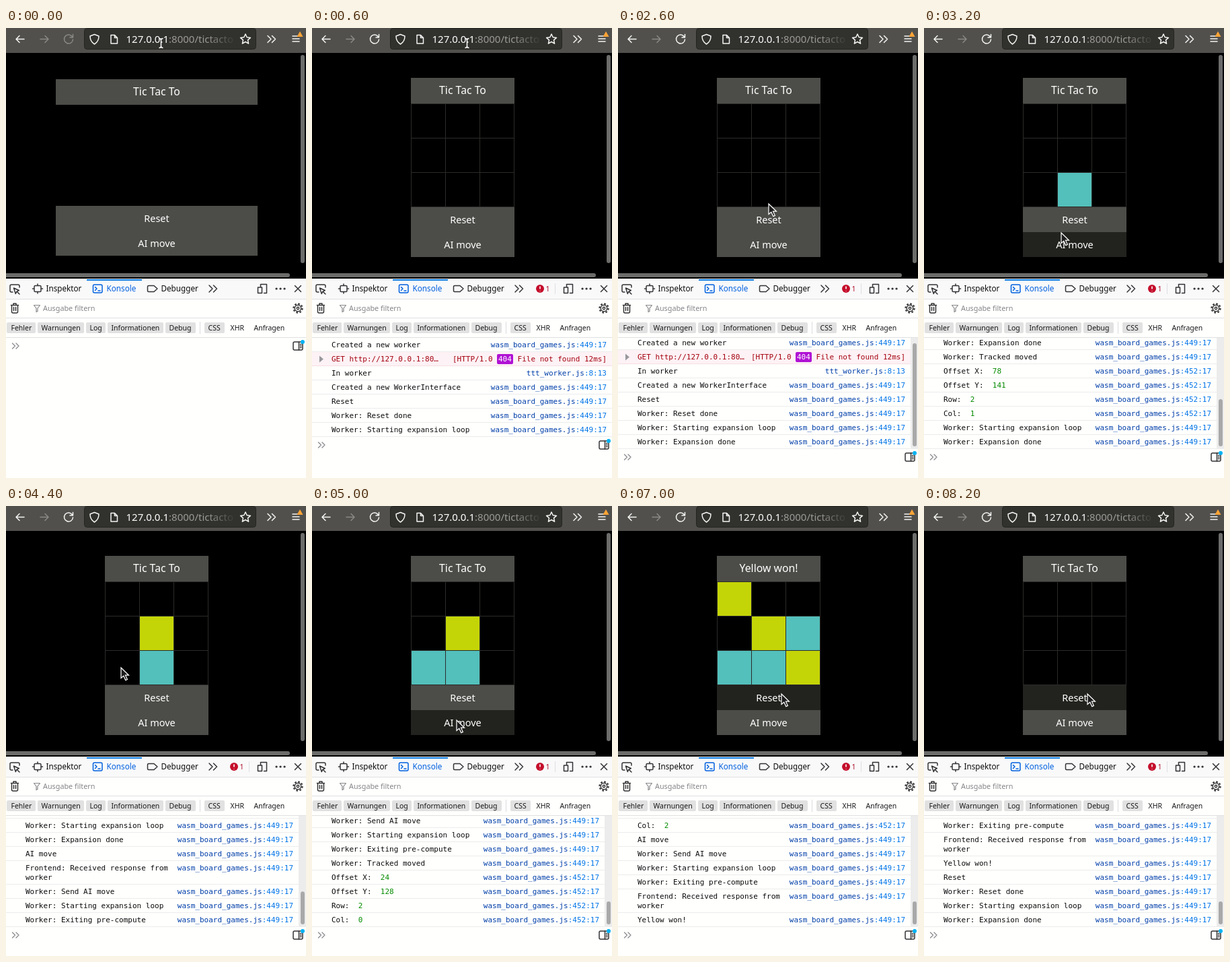
Animation, 446 px wide and 668 px high, one loop 9.4 s. Source, as an HTML page:

```html
<!DOCTYPE html>
<html lang="de">
<head>
<meta charset="utf-8">
<title>Tic Tac To</title>
<style>
html, body { margin: 0; width: 100%; height: 100%; overflow: hidden; background: #fffffd; }
svg { display: block; }
text { font-family: "Noto Sans", "Open Sans", sans-serif; white-space: pre; }
.icon { fill: none; stroke: #333336; stroke-width: 1.5; stroke-linecap: round; stroke-linejoin: round; }
.light { stroke: #f4f4f2; }
.tab text { font-size: 11.7px; fill: #0c0c0d; }
.chips text { font-size: 10.5px; fill: #18181a; }
.page text { fill: #fff; font-size: 14.5px; text-anchor: middle; }
#rows text, #rows tspan { font-family: "DejaVu Sans Mono", monospace; }
#rows text { font-size: 11px; fill: #0c0c0d; }
#rows .end { text-anchor: end; }
#rows .file { fill: #003eaa; }
#rows .pos { fill: #0074e8; }
#rows .num { fill: #058b00; }
#rows .err { fill: #a4000f; }
</style>
</head>
<body>
<svg width="446" height="668" viewBox="0 0 446 668">
  <defs>
    <linearGradient id="fade"><stop stop-color="#31312e" stop-opacity="0"/><stop offset="1" stop-color="#31312e"/></linearGradient>
    <clipPath id="view"><rect y="460" width="446" height="165"/></clipPath>
  </defs>
  <rect width="446" height="668" fill="#fffffd"/>

  <!-- browser bar -->
  <rect width="446" height="37" fill="#51504d"/>
  <rect x="116.500" y="0.500" width="255" height="31" rx="4" fill="#31312e" stroke="#242421"/>
  <g class="icon light">
    <path d="M27 16.500H15M20 11.500l-5 5 5 5"/>
    <path d="M51 16.500H63M58 11.500l5 5-5 5" opacity=".35"/>
    <path id="reload" d="M98.500 13a6.500 6.500 0 1 0 1 4M99.500 9.500V14H95"/>
    <path d="M131.500 9.500l6.500 2.500q0 8-6.500 12-6.500-4-6.500-12z"/>
    <path d="M156 10.500h5.500l4 4v8.500h-9.500zM161.500 10.500v4h4"/>
    <path d="M356 9l2.200 4.800 5.300.6-4 3.500 1.100 5.300-4.600-2.700-4.600 2.700 1.100-5.300-4-3.500 5.300-.6z"/>
    <path d="M389 11.500l5 5-5 5M395.500 11.500l5 5-5 5"/>
    <path d="M426 12h10M426 16h10M426 20h10"/>
  </g>
  <path d="M437 5l4.500 8h-9z" fill="#ffa436"/>
  <text x="178.500" y="22" font-size="15" fill="#fff">127.0.0.1<tspan fill="#9b9a97">:8000/tictacto</tspan></text>
  <rect x="300" y="4" width="42" height="25" fill="url(#fade)"/>

  <!-- web page -->
  <rect y="37" width="446" height="335" fill="#000"/>
  <rect x="438" y="40" width="6" height="309" rx="3" fill="#6c6c6a"/>
  <rect x="-3" y="364" width="425" height="6" rx="3" fill="#6c6c6a"/>
  <g class="page" id="page"></g>

  <!-- developer tools -->
  <rect y="372" width="446" height="30" fill="#f9f9fa"/>
  <path d="M0 402.500H446M0 430.500H446M0 459.500H446" stroke="#e0e0e2"/>
  <rect x="120" y="373" width="82" height="2" fill="#0a7be6"/>
  <g class="icon">
    <path d="M10 392H8q-2 0-2-2v-7q0-2 2-2h10q2 0 2 2v2M11.500 386l2.800 8.500 1.700-3.300 3.300-1.700zM16.500 391.500l3.500 3.500"/>
    <rect x="42" y="382.500" width="10" height="9" rx="1.500"/>
    <path d="M47 380v2M47 392v2M39.500 387h2M52.500 387h2"/>
    <path d="M212 382.500h8l5 4.500-5 4.500h-8q-1.500 0-1.500-1.500v-6q0-1.500 1.500-1.500z"/>
    <path d="M302 382l5 5-5 5M308.500 382l5 5-5 5"/>
    <path d="M378.500 384v-3.500h9v13h-4M374.500 385h6v8.500h-6z"/>
    <path d="M402 387h.1M408 387h.1M414 387h.1" stroke-width="3.200"/>
    <path d="M429.500 382.500l9 9M438.500 382.500l-9 9"/>
    <path d="M7.500 411.500h11M11 411v-2h4v2M8.500 412v9q0 2 2 2h5q2 0 2-2v-9M11.500 414.500v5M14.500 414.500v5"/>
    <path d="M41.500 411.500h9l-3.500 4.500v4.500l-2 1v-5.500z" stroke="#8a8a8e" stroke-width="1.200"/>
    <circle cx="434" cy="416" r="4.700"/>
    <circle cx="434" cy="416" r="1.700"/>
    <circle cx="434" cy="416" r="6.600" stroke-width="2.200" stroke-linecap="butt" stroke-dasharray="2.600 2.584"/>
    <g stroke="#0060df"><rect x="129.500" y="381" width="13.500" height="12" rx="2"/><path d="M132.500 384.500l2.500 2.500-2.500 2.500M137 390h3"/></g>
  </g>
  <g class="tab">
    <text x="59.500" y="391">Inspektor</text>
    <text x="149.500" y="391" style="fill:#0060df">Konsole</text>
    <text x="230.500" y="391">Debugger</text>
  </g>
  <g id="badge">
    <circle cx="339" cy="387" r="6" fill="#c50e2c"/>
    <path d="M339 383.500v4M339 390v.5" stroke="#fff" stroke-width="1.600"/>
    <text x="347.500" y="391" font-size="10.500" fill="#b0102a">1</text>
    <path d="M361.500 379v16" stroke="#e0e0e2"/>
  </g>
  <text x="55" y="420" font-size="10.800" fill="#85858a">Ausgabe filtern</text>
  <g class="chips" id="chips"></g>
  <path d="M288.500 436v18" stroke="#dcdcde"/>

  <!-- console -->
  <g id="rows" clip-path="url(#view)"></g>
  <g id="scroll"><rect x="435" y="460" width="11" height="165" fill="#ececec"/><rect id="thumb" x="438" width="6" rx="3" fill="#a9a9a9"/></g>
  <g id="prompt">
    <g class="icon">
      <path d="M9.500 8l4 4-4 4M15 8l4 4-4 4" stroke="#8c8c90" stroke-width="1.300"/>
      <rect x="427" y="6" width="14" height="12" rx="2"/>
      <path d="M435.500 6v12M437.500 9.500h1.500M437.500 12h1.500M437.500 14.500h1.500"/>
    </g>
    <circle cx="441" cy="6" r="3" fill="#00b3f4"/>
  </g>

  <!-- pointers -->
  <path id="beam" d="M227.500 15.500q3 0 3 2.500v9q0 2.500-3 2.500M233.500 15.500q-3 0-3 2.500v9q0 2.500 3 2.500" fill="none" stroke="#fff" stroke-width="1.500"/>
  <path id="arrow" d="M0 0V15.500L3.800 12.200 6.800 18.600 9.400 17.400 6.500 11.200H11.500Z" fill="#1c1c1c" stroke="#fff" stroke-width="1.200"/>
</svg>
<script>
const LOOP = 9400, STEP = 200;
const TEAL = "#53c0bb", YELLOW = "#c4d507", PANEL = "#4c4c48", HOVER = "#22221e";
const $ = id => document.getElementById(id);
const rect = (x, y, w, h, fill, rx = 0) => `<rect x="${x}" y="${y}" width="${w}" height="${h}" rx="${rx}" fill="${fill}"/>`;
const text = (x, y, str, attrs = "") => `<text x="${x}" y="${y}" ${attrs}>${str}</text>`;

const START = "Worker: Starting expansion loop", DONE = "Worker: Expansion done";
const EXIT = "Worker: Exiting pre-compute", SEND = "Worker: Send AI move", ANSWER = "Frontend: Received response from\nworker";
const ERROR = "GET http://127.0.0.1:80…";
const click = (x, y, row, col) => ["Worker: Tracked moved", "Offset X:  " + x, "Offset Y:  " + y, "Row:  " + row, "Col:  " + col];

// [time, console lines]
const log = [
  [200, ["Created a new worker", ERROR]],
  [400, ["In worker", "Created a new WorkerInterface", "Reset"]],
  [600, ["Worker: Reset done", START]],
  [1000, [DONE]],
  [2800, click(78, 141, 2, 1)],
  [3000, [START]],
  [3200, [DONE]],
  [3600, ["AI move"]],
  [3800, [ANSWER, SEND]],
  [4000, [START]],
  [4200, [EXIT]],
  [4600, click(24, 128, 2, 0)],
  [5200, ["AI move", SEND, START]],
  [5400, [EXIT, ANSWER]],
  [6000, click(121, 83, 1, 2)],
  [6800, ["AI move", SEND, START, EXIT, ANSWER, "Yellow won!"]],
  [7800, ["Reset", "Worker: Reset done", START]],
  [8200, [DONE]],
];
// [time, row, column, colour]
const moves = [
  [2800, 2, 1, TEAL], [3800, 1, 1, YELLOW], [4600, 2, 0, TEAL],
  [5200, 2, 2, YELLOW], [5800, 1, 2, TEAL], [6800, 0, 0, YELLOW],
];
const WON = 6800, RESET = 7800;
// [time, x, y]
const path = [
  [0, 230, 22], [800, 230, 22], [1800, 215, 328], [2200, 215, 328], [2700, 225, 253], [2800, 225, 253],
  [3200, 204, 304], [3800, 204, 304], [4400, 171, 240], [4600, 171, 240], [5000, 215, 318],
  [5200, 215, 318], [5800, 268, 195], [6400, 231, 318], [6800, 231, 318], [7000, 243, 279], [LOOP, 243, 279],
];

$("chips").innerHTML = [
  [1, 43, 7.5, "Fehler", 1], [47, 69, 52.5, "Warnungen", 1], [119, 29, 124.5, "Log", 1],
  [151, 83, 156.500, "Informationen", 1], [237, 45, 242.5, "Debug", 1], [295, 30, 300.5, "CSS", 1],
  [0, 0, 333.5, "XHR"], [0, 0, 368.5, "Anfragen"],
].map(([x, w, tx, label, on]) => (on ? rect(x, 437, w, 16, "#e1e1e1", 2) : "") + text(tx, 449, label)).join("");

function pointerAt(t) {
  const i = path.findIndex(p => p[0] > t);
  const [t0, x0, y0] = path[i - 1], [t1, x1, y1] = path[i];
  const u = (t - t0) / (t1 - t0), k = u * u * (3 - 2 * u);
  return [x0 + (x1 - x0) * k, y0 + (y1 - y0) * k];
}

function drawPage(t, py) {
  const loaded = t >= 400, x = loaded ? 147 : 74, w = loaded ? 154 : 300;
  const top = loaded ? 74 : 76, reset = loaded ? 266 : 264;
  const over = y => loaded && py >= y && py < y + 37 ? HOVER : PANEL;
  const title = t >= WON && t < RESET ? "Yellow won!" : "Tic Tac To";
  let out = rect(x, top, w, 38, PANEL) + text(224, top + 24, title, 'style="font-size:15.8px"');
  out += rect(x, reset, w, 37, over(reset)) + rect(x, reset + 37, w, 37, over(reset + 37));
  out += text(224, reset + 24, "Reset") + text(224, reset + 61, "AI move");
  if (loaded) {
    for (let i = 0; i < 4; i++) out += rect(147 + 51 * i, 112, 1, 154, "#2b2b2a") + rect(147, 112 + 51 * i, 154, 1, "#2b2b2a");
    if (t < RESET) for (const [at, row, col, fill] of moves)
      if (t >= at) out += rect(148 + 51 * col, 113 + 51 * row, 50, 50, fill);
  }
  $("page").innerHTML = out;
}

function drawRow(line, y, h, right) {
  const base = y + 14;
  if (line === ERROR)
    return rect(0, y, 446, h, "#fdf2f5") + rect(0, y + h - 1, 446, 1, "#f8dfe6") +
      `<path d="M11 ${y + 5.5}v10l6-5z" fill="#98989c"/>` + text(29, base, line, 'class="err"') +
      text(right - 229, base, "[HTTP/1.0", 'class="err"') + rect(right - 163, y + 3, 24, 15, "#b012d4", 2) +
      text(right - 161, base, "404", 'style="fill:#fff"') + text(right, base, "File not found 12ms]", 'class="end err"');
  const [, label, num] = line.match(/^(.*:  )(\d+)$/) || [0, line, ""];
  const [file, pos] = line === "In worker" ? ["ttt_worker.js", ":8:13"] : ["wasm_board_games.js", num ? ":452:17" : ":449:17"];
  return rect(0, y + h - 1, 446, 1, "#ececee") +
    label.split("\n").map((part, i) => text(29, base + 14 * i, part + (num && `<tspan class="num">${num}</tspan>`))).join("") +
    text(right, base, `<tspan class="file">${file}</tspan><tspan class="pos">${pos}</tspan>`, 'class="end"');
}

function drawConsole(t) {
  const lines = log.filter(e => e[0] <= t).flatMap(e => e[1]);
  const heights = lines.map(l => l.includes("\n") ? 35 : 21);
  const total = heights.reduce((a, b) => a + b, 0), full = total > 165;
  let y = full ? 625 - total : 460;
  $("rows").innerHTML = lines.map((line, i) => {
    const row = drawRow(line, y, heights[i], full ? 427 : 438);
    y += heights[i];
    return row;
  }).join("");
  $("prompt").setAttribute("transform", `translate(0 ${y})`);
  $("scroll").style.display = full ? "" : "none";
  const size = total > 500 ? 34 : Math.max(34, 18970 / Math.max(1, total - 44));
  $("thumb").setAttribute("y", 621 - size);
  $("thumb").setAttribute("height", size);
}

let shown = -1;
function frame() {
  const t = Math.floor(performance.now() % LOOP / STEP) * STEP;
  if (t !== shown) {
    shown = t;
    const [x, y] = pointerAt(t), typing = y < 32;
    drawPage(t, y);
    drawConsole(t);
    $("reload").setAttribute("opacity", t < 200 ? 0.35 : 1);
    $("badge").style.display = t < 200 ? "none" : "";
    $("beam").style.display = typing ? "" : "none";
    $("arrow").style.display = typing ? "none" : "";
    $("arrow").setAttribute("transform", `translate(${Math.round(x)} ${Math.round(y)})`);
  }
  requestAnimationFrame(frame);
}
frame();
</script>
</body>
</html>
```
